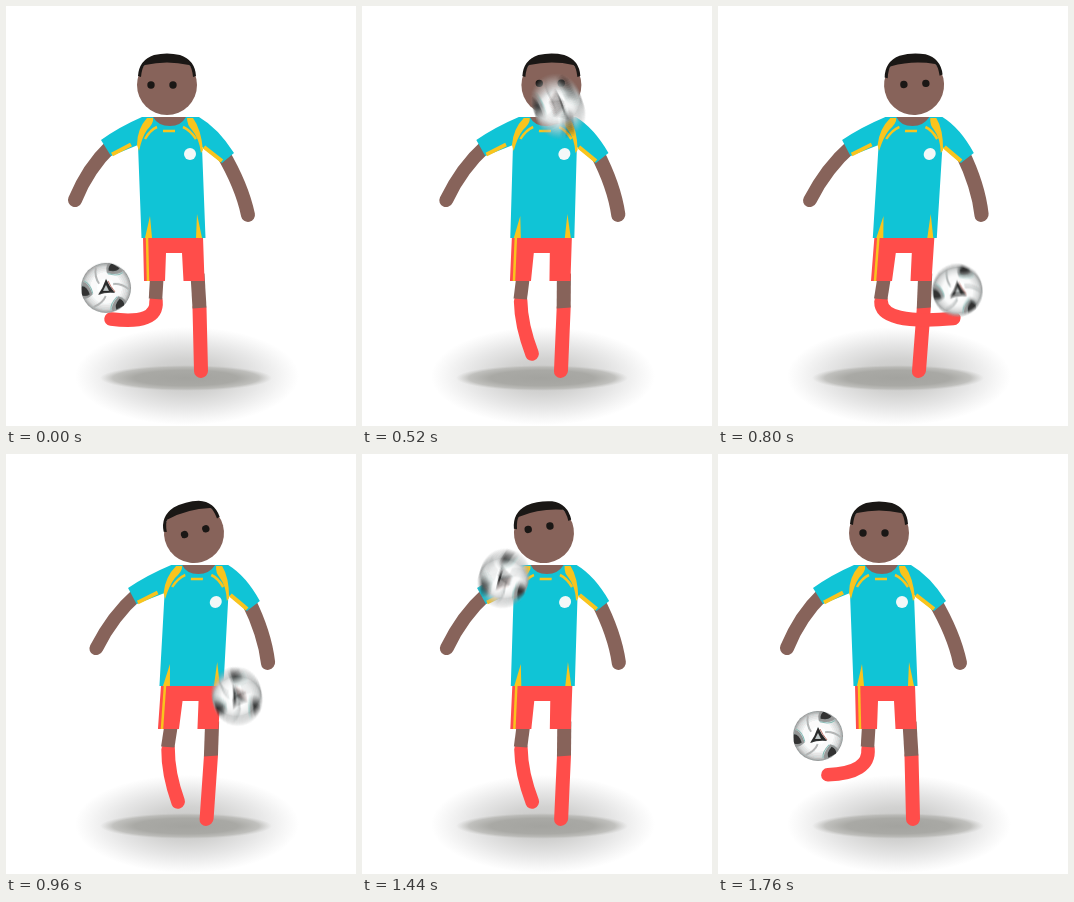
Recreate the animation shown at these times as an HTML page with a canvas. Size 350x420 px, loop 1.8 s.

```html
<!DOCTYPE html>
<html lang="en">
<head>
<meta charset="utf-8">
<title>Football juggling</title>
<style>
html, body { margin: 0; width: 350px; height: 420px; overflow: hidden; background: #fff; }
canvas { display: block; }
</style>
</head>
<body>
<canvas id="stage" width="350" height="420"></canvas>
<script>
const LOOP = 1800, SHUTTER = 20, R = 25;
const SKIN = '#87635a', SHIRT = '#10c4d6', RED = '#ff4d4a', GOLD = '#f9c41d', DARK = '#1a1715';
const ctx = document.getElementById('stage').getContext('2d');

// Smooth monotone curve through flat [time, value, ...] keys
function track(...keys) {
  const t = keys.filter((_, i) => i % 2 === 0), v = keys.filter((_, i) => i % 2);
  const slope = t.slice(1).map((x, i) => (v[i + 1] - v[i]) / (x - t[i]));
  const tan = t.map((_, i) => {
    const a = slope[i - 1] || 0, b = slope[i] || 0;
    return a * b > 0 ? 2 * a * b / (a + b) : 0;
  });
  return time => {
    let i = 0;
    while (i < t.length - 2 && time >= t[i + 1]) i++;
    const d = t[i + 1] - t[i], u = (time - t[i]) / d, w = 1 - u;
    return w * w * (1 + 2 * u) * v[i] + u * u * (3 - 2 * u) * v[i + 1]
      + d * u * w * (w * tan[i] - u * tan[i + 1]);
  };
}

const ballX = track(0, 100, 280, 133, 680, 230, 830, 240, 960, 231, 1160, 205, 1440, 142, 1760, 100, 1800, 100);
const ballY = track(0, 282, 280, 72, 385, 29, 680, 229, 830, 288, 960, 243, 1160, 72, 1265, 28, 1440, 124, 1760, 282, 1800, 282);
const lean = track(0, 0, 280, .02, 680, 1, 820, 1, 960, .93, 1160, .93, 1440, .69, 1740, 0, 1800, 0);
const footX = track(0, 105, 280, 165, 520, 165, 680, 189, 820, 226, 960, 165, 1500, 165, 1760, 110, 1800, 105);
const footY = track(0, 313, 280, 348, 520, 348, 680, 329, 820, 312, 960, 348, 1500, 348, 1760, 321, 1800, 313);
const headX = track(0, 161, 280, 165, 680, 201, 960, 188, 1160, 187, 1440, 182, 1760, 161, 1800, 161);
const tilt = track(0, 0, 280, -10, 680, 5, 960, -15, 1160, -12, 1440, -9, 1760, 0, 1800, 0);
const eyeX = track(0, -5, 280, -3, 680, 0, 960, 1.5, 1160, 0, 1440, -4, 1760, -5, 1800, -5);
const eyeY = track(0, 0, 280, -3, 680, -1, 960, -1, 1160, -4, 1440, -6, 1760, 0, 1800, 0);

function fill(color, d, c = ctx) {
  c.fillStyle = color;
  c.fill(new Path2D(d));
}
function line(color, width, d, cap = 'butt', c = ctx) {
  c.strokeStyle = color;
  c.lineWidth = width;
  c.lineCap = cap;
  c.stroke(new Path2D(d));
}
function disc(color, x, y, r, c = ctx) {
  c.fillStyle = color;
  c.beginPath();
  c.arc(x, y, r, 0, 7);
  c.fill();
}
function radial(c, r, ...stops) {
  const g = c.createRadialGradient(0, 0, 0, 0, 0, r);
  for (const [at, color] of stops) g.addColorStop(at, color);
  return g;
}
function layer(w, h) {
  return Object.assign(document.createElement('canvas'), { width: w, height: h });
}

function makeBall() {
  const img = layer(56, 56), c = img.getContext('2d');
  c.translate(28, 28);
  disc(radial(c, R, [0, '#fff'], [.6, '#f0f1f1'], [.86, '#c9cbcb'], [1, '#8f9292']), 0, 0, R, c);
  c.save();
  c.beginPath();
  c.arc(0, 0, R, 0, 7);
  c.clip();
  for (let i = 0; i < 3; i++) {
    c.save();
    c.rotate((i * 120 - 58) * Math.PI / 180);
    fill('#8d9292', 'M13 -7Q19 -13 23 -11L24 5Q18 6 13 -7Z', c);
    fill('#282b2b', 'M16 -7Q20 -10 24 -8L24 1Q19 1 16 -7Z', c);
    line('#7fb3ae', 1, 'M13 -6Q16 4 22 6', 'butt', c);
    line('#a9aeae', 2, 'M7 4Q12 10 11 20', 'butt', c);
    c.restore();
  }
  c.restore();
  fill('#252727', 'M0 -9Q3 -2 9 5Q0 4 -8 7Q-3 0 0 -9Z', c);
  fill('#b9bcbc', 'M0 -3L3 3L-3 3Z', c);
  line('#b2685f', 1, 'M2 -7Q4 -2 9 4', 'butt', c);
  return img;
}

const ball = makeBall(), blur = layer(350, 420), blurCtx = blur.getContext('2d');

function drawBall(time) {
  const n = 10;
  blurCtx.setTransform(1, 0, 0, 1, 0, 0);
  blurCtx.clearRect(0, 0, 350, 420);
  blurCtx.globalCompositeOperation = 'lighter';
  blurCtx.globalAlpha = 1 / n;
  for (let i = 0; i < n; i++) {
    const t = (time + ((i + .5) / n - .5) * SHUTTER + LOOP) % LOOP, x = ballX(t);
    const a = (x - 100) / 140 * 2 * Math.PI;
    blurCtx.setTransform(Math.cos(a), Math.sin(a), -Math.sin(a), Math.cos(a), x, ballY(t));
    blurCtx.drawImage(ball, -28, -28);
  }
  ctx.drawImage(blur, 0, 0);
}

function drawShadow() {
  const oval = (x, y, rx, ry, ...stops) => {
    ctx.save();
    ctx.translate(x, y);
    ctx.scale(rx, ry);
    disc(radial(ctx, 1, ...stops), 0, 0, 1);
    ctx.restore();
  };
  oval(181, 370, 112, 49, [0, '#c6c6c5'], [.35, '#d2d2d1'], [.65, '#e6e6e6'], [.88, '#f7f7f7'], [1, '#fff']);
  oval(180, 372, 86, 13, [0, '#a3a39f'], [.6, '#a9a9a5'], [.85, 'rgba(178,178,174,.7)'], [1, 'rgba(195,195,192,0)']);
}

function drawBody(time) {
  const s = lean(time);
  ctx.save();
  // Whole figure shears above the standing foot
  ctx.transform(1, 0, -.1 * s, 1, 42.5 * s, 0);

  line(RED, 14, 'M193.5 302L195 365', 'round');
  line(SKIN, 14, 'M191.5 268L193.5 302');
  line(RED, 13.5, `M150 295Q152 319 ${footX(time)} ${footY(time)}`, 'round');
  line(SKIN, 13.5, 'M151 268L149.5 293');

  fill(RED, 'M137 231H197L198.500 275H177.500L176 247H160L159 275H138Z');
  line(GOLD, 2.5, 'M141 231L142 275');

  line(SKIN, 14, 'M105 140Q82 162 69 194', 'round');
  line(SKIN, 14, 'M216 146Q236 180 242 209', 'round');

  fill(SHIRT, 'M136 111H193Q212 122 228 147L216 157L196 141L199.500 232H135.500L132 139L105 150L95 134Q113 121 136 111Z');
  fill(SKIN, 'M147 111H180Q175 120 164 120Q152 120 147 111Z');
  line(GOLD, 4, 'M106 148.500L125 138.500');
  line(GOLD, 4, 'M198 141L216 155');
  fill(GOLD, 'M141 112H147Q148 117 141 124Q136 131 133 145L131 139Q131 123 141 112Z');
  fill(GOLD, 'M181 112H187Q195 123 197 144L195 147Q193 132 186 124Q181 119 181 112Z');
  line(GOLD, 2.5, 'M151 121Q144 124 139 133');
  line(GOLD, 2.5, 'M177 121Q184 124 190 133');
  line(GOLD, 2.5, 'M157 125H169');
  fill(GOLD, 'M144 210L146 232H139Z');
  fill(GOLD, 'M191 208L196 232H190Z');
  disc('#f3f8f8', 184, 148, 6);
  ctx.restore();
}

function drawHead(time) {
  ctx.save();
  ctx.translate(headX(time), 79);
  ctx.rotate(tilt(time) * Math.PI / 180);
  disc(SKIN, 0, 0, 30);
  fill(DARK, 'M-29 -9Q-28 -25 -13 -30Q0 -33 13 -30Q28 -25 29 -9L26 -8Q25 -18 22 -20Q0 -25 -22 -20Q-25 -18 -26 -8Z');
  ctx.translate(eyeX(time), eyeY(time));
  disc(DARK, -11, 0, 3.7);
  disc(DARK, 11, 0, 3.7);
  ctx.restore();
}

function frame() {
  const time = performance.now() % LOOP;
  ctx.fillStyle = '#fff';
  ctx.fillRect(0, 0, 350, 420);
  drawShadow();
  drawBody(time);
  drawHead(time);
  drawBall(time);
  requestAnimationFrame(frame);
}
frame();
</script>
</body>
</html>
```
